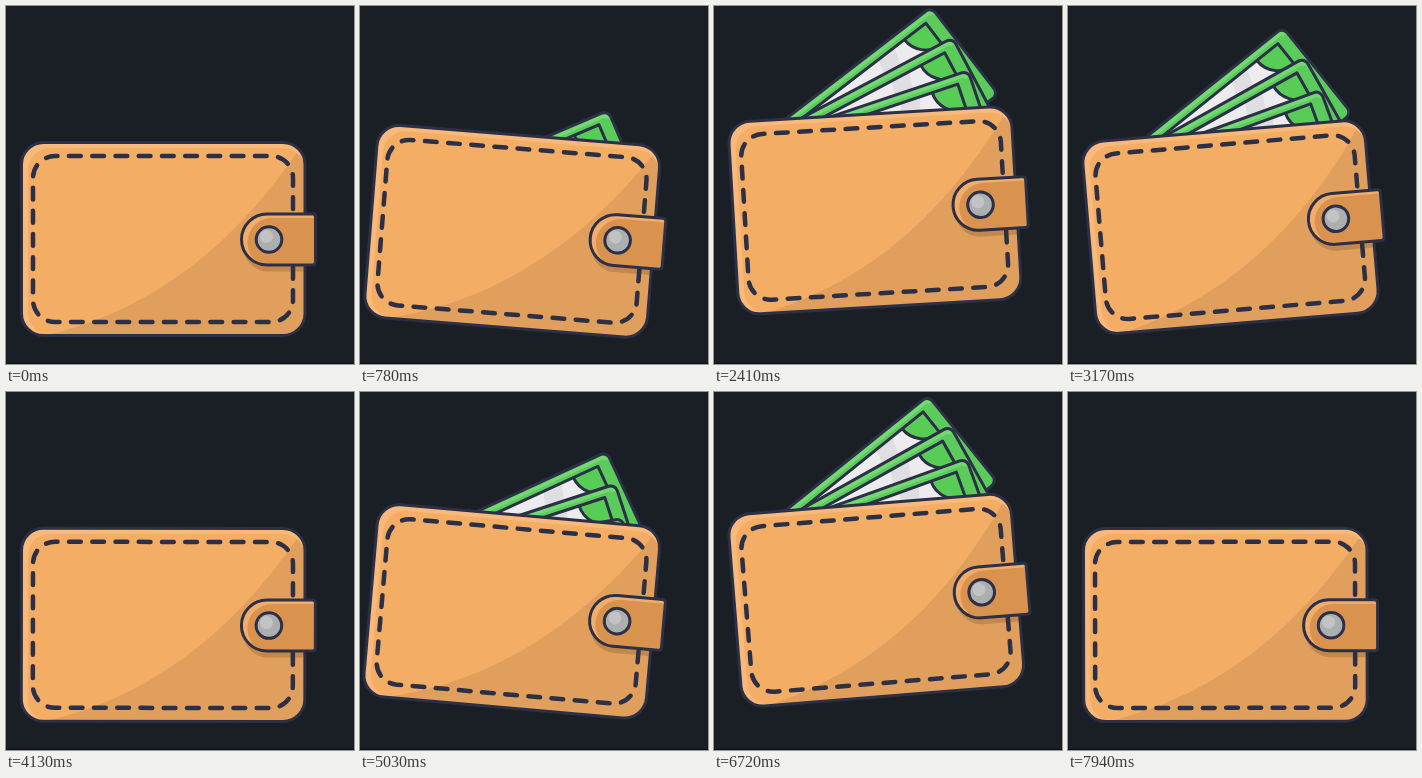
An HTML page for the animation above (8010 ms loop, 348x358 px).

```html
<!DOCTYPE html>
<html lang="en">
<head>
<meta charset="utf-8">
<title>Wallet</title>
<style>
  html, body { margin: 0; width: 100%; height: 100%; overflow: hidden; background: #1a1e25; }
  svg { display: block; width: 100vw; height: 100vh; }
  .line { fill: none; stroke: #2b3046; stroke-width: 3; stroke-linejoin: round; }
</style>
</head>
<body>
<svg viewBox="0 0 348 358">
  <defs>
    <path id="tab" d="M261 208H306.500Q309.500 208 309.500 211V256Q309.500 259 306.500 259H261A25.500 25.500 0 0 1 261 208Z"/>
    <clipPath id="body"><rect x="16" y="137" width="282.500" height="192" rx="22"/></clipPath>
    <clipPath id="face"><rect x="22" y="142" width="277" height="187" rx="22"/></clipPath>
    <clipPath id="strap"><use href="#tab"/></clipPath>
    <clipPath id="pocket"><rect x="-60" y="-100" width="480" height="332"/></clipPath>
    <clipPath id="field"><rect x="-200" y="2.500" width="193" height="93"/></clipPath>
    <g id="bill">
      <rect x="-208" y="-7" width="215" height="110" rx="7" fill="#5bcb5c"/>
      <path d="M-206 -3.500H0Q3.500 -3.500 3.500 0" fill="none" stroke="#74d972" stroke-width="3.500"/>
      <rect class="line" x="-208" y="-7" width="215" height="110" rx="7"/>
      <g clip-path="url(#field)">
        <rect x="-200" y="2" width="194" height="95" fill="#ececee"/>
        <path d="M-66 0H-46L-78 97H-98Z" fill="#dfdfe3"/>
        <circle class="line" cx="-7" cy="2.500" r="27" style="fill:#58cd55"/>
      </g>
      <rect class="line" x="-200" y="2.500" width="193" height="93"/>
    </g>
  </defs>
  <rect width="348" height="358" fill="#1a1e25"/>
  <g id="wallet">
    <g id="bills" clip-path="url(#pocket)"></g>
    <g clip-path="url(#body)">
      <rect x="14" y="135" width="287" height="196" fill="#f9b97a"/>
      <g clip-path="url(#face)">
        <rect x="14" y="135" width="287" height="196" fill="#f3ad64"/>
        <path d="M296 139C250 208 172 298 42 329V340H310V139Z" fill="#e09f5c"/>
      </g>
      <path d="M261 215H299V265.500H261A25.500 25.500 0 0 1 239 250Z" fill="#c6884a"/>
    </g>
    <rect class="line" x="15.500" y="136.500" width="283.500" height="193" rx="22"/>
    <path d="M63 150H265A22 22 0 0 1 287 172V294A22 22 0 0 1 265 316H49A22 22 0 0 1 27 294V172A22 22 0 0 1 49 150Z"
      fill="none" stroke="#2b3046" stroke-width="4.500" stroke-linecap="round" pathLength="816" stroke-dasharray="11.800 11.514"/>
    <g clip-path="url(#strap)">
      <rect x="230" y="204" width="82" height="60" fill="#f3ad6a"/>
      <path d="M312 212H266A24.500 24.500 0 0 0 266 261H312Z" fill="#d9934f"/>
    </g>
    <use class="line" href="#tab"/>
    <circle cx="263" cy="233.500" r="12.800" fill="#adaeaf" stroke="#2b3046" stroke-width="3"/>
    <circle cx="260.500" cy="230.500" r="6.500" fill="#c3c3c3"/>
  </g>
  <rect y="356.500" width="348" height="1.500" fill="#111318"/>
</svg>
<script>
const LOOP = 8010, CYCLE = 4025;

// corner position, resting angle, extra swing while tucked in
const BILLS = [
  { x: 223.5, y: 43, angle: -34.2, swing: 9 },
  { x: 241.5, y: 74.5, angle: -24.6, swing: 3 },
  { x: 253.5, y: 107.5, angle: -15.2, swing: 1 }
];
const TILT = [[0, 0], [0.25, 5], [0.75, -5], [1, 0]];
const LIFT = [[0, 0], [0.515, -29.5], [1, 0]];
const SLIDE = [[0, 147], [0.38, 0], [0.75, 0], [1, 147]];
const FAN = [[0, 1], [0.5, 0], [0.75, 0], [1, 1]];

// cubic-bezier(.5, 0, .5, 1)
function ease(x) {
  let lo = 0, hi = 1;
  for (let i = 0; i < 24; i++) {
    const u = (lo + hi) / 2;
    if (1.5 * u * (1 - u) + u ** 3 < x) lo = u; else hi = u;
  }
  return lo * lo * (3 - 2 * lo);
}

function at(track, p) {
  let i = 1;
  while (i < track.length - 1 && p > track[i][0]) i++;
  const [p0, v0] = track[i - 1], [p1, v1] = track[i];
  return v0 + (v1 - v0) * ease((p - p0) / (p1 - p0));
}

const wallet = document.getElementById('wallet');
const notes = BILLS.map(() => {
  const use = document.createElementNS('http://www.w3.org/2000/svg', 'use');
  use.setAttribute('href', '#bill');
  document.getElementById('bills').append(use);
  return use;
});

function draw(t) {
  const p = (t % CYCLE) / CYCLE;
  wallet.setAttribute('transform', `translate(0 ${at(LIFT, p)}) rotate(${at(TILT, p)} 151 170.5)`);
  const drop = at(SLIDE, p), fan = at(FAN, p);
  BILLS.forEach((b, i) => notes[i].setAttribute('transform',
    `translate(0 ${drop}) rotate(${b.swing * fan} ${b.x} ${b.y + 150}) translate(${b.x} ${b.y}) rotate(${b.angle})`));
}

const start = performance.now();
function tick() {
  draw((performance.now() - start) % LOOP);
  requestAnimationFrame(tick);
}
tick();
</script>
</body>
</html>
```
